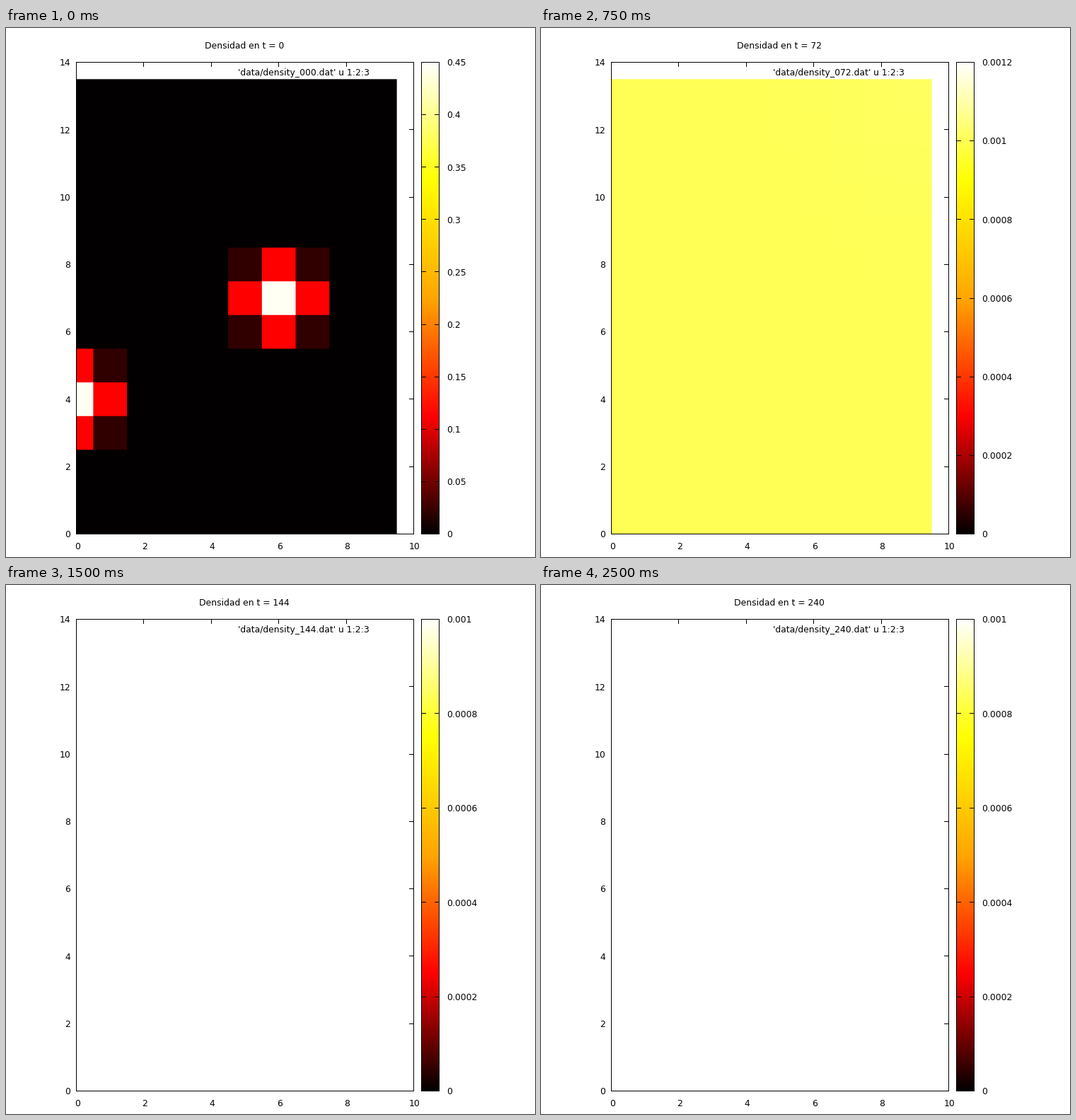
Animation of 748 by 748 pixels, one loop 2750 ms. Source, as a matplotlib script:

```python
import numpy as np
import matplotlib.pyplot as plt
from matplotlib.animation import FuncAnimation

SIZE = 748
DPI = 88
COLS, ROWS = 10, 14
STEPS = 11
LEFT, RIGHT, TOP, BOTTOM = 99, 576, 48, 715
BAR_L, BAR_R = 587, 612
TICK = 6
FLOOR = 0.001
Y, X = np.mgrid[:ROWS, :COLS]

plt.rcParams["font.family"] = "DejaVu Sans"
plt.rcParams["font.size"] = 12.4 * 72 / DPI


def x_px(v):
    return LEFT + 0.5 + (RIGHT - LEFT) * v / COLS


def y_px(v):
    return BOTTOM + 0.5 - (BOTTOM - TOP) * v / ROWS


def palette(v):
    """Black, red, orange, yellow, white in equal steps."""
    stops = np.linspace(0, 1, 5)
    channels = ([0, 255, 255, 255, 255], [0, 0, 165, 255, 255], [0, 0, 0, 0, 255])
    return np.stack([np.interp(v, stops, c) for c in channels], axis=-1)


# Density fields, indexed [row, column]

def two_blobs():
    field = np.full((ROWS, COLS), FLOOR)
    for cx, cy in [(0, 4), (6, 7)]:
        dx, dy = abs(X - cx), abs(Y - cy)
        near = np.maximum(dx, dy) <= 1
        field[near] = np.array([0.445, 0.1125, 0.021])[(dx + dy)[near]]
    return field


def spread_cloud():
    """Bell that bends to the right and widens towards the top."""
    h = Y - 5
    center = 5.8 + 0.12 * h + 0.031 * h ** 2
    width = np.maximum(14, 12 + 1.1 * h)
    bell = np.exp(-(Y - 10.5) ** 2 / 21 - (X - center) ** 2 / width)
    return np.maximum(FLOOR, 0.093 * bell)


def corner_rest(peak):
    """What is left in the top right corner."""
    fall = (COLS - 1 - X) ** 1.8 / 7.3 + (ROWS - 1 - Y) ** 1.8 / 11
    return FLOOR + peak * np.exp(-fall)


# Field, colour bar intervals, interval size; the last one stays to the end
SCENES = [
    (two_blobs(), 9, 0.05),
    (spread_cloud(), 10, 0.01),
    (corner_rest(6.8e-3), 8, 0.001),
    (corner_rest(1.2e-5), 6, 0.0002),
    (corner_rest(0), 6, 0.0002),
    (corner_rest(0), 5, 0.0002),
]


def coverage(lo, hi):
    """Share of every pixel that each span lo..hi covers."""
    px = np.arange(SIZE)
    ends = np.minimum(hi[:, None], px + 1)
    starts = np.maximum(lo[:, None], px)
    return np.clip(ends - starts, 0, 1)


x_edges = np.maximum(x_px(np.arange(COLS + 1) - 0.5), LEFT + 1)
y_edges = np.minimum(y_px(np.arange(ROWS + 1) - 0.5), BOTTOM)
COVER_X = coverage(x_edges[:-1], x_edges[1:])
COVER_Y = coverage(y_edges[1:], y_edges[:-1])


def paint_cells(img, colors):
    """Blend the cells into the white ground."""
    img -= np.einsum("ry,rck,cx->yxk", COVER_Y, 255 - colors, COVER_X, optimize=True)


def box(img, left, right):
    img[TOP:BOTTOM + 1, [left, right]] = 0
    img[[TOP, BOTTOM], left:right + 1] = 0


def bar_y(k, count):
    return BOTTOM + 0.5 - (BOTTOM - TOP) * k / count


def render(field, count, step):
    img = np.full((SIZE, SIZE, 3), 255.0)
    paint_cells(img, palette(field / (count * step)))
    box(img, LEFT, RIGHT)
    for v in range(2, COLS, 2):
        img[TOP:TOP + TICK + 1, int(x_px(v))] = 0
    for v in range(2, ROWS, 2):
        img[int(y_px(v)), RIGHT - TICK:RIGHT + 1] = 0

    ramp = palette(np.linspace(1, 0, BOTTOM - TOP + 1))
    img[TOP:BOTTOM + 1, BAR_L:BAR_R + 1] = ramp[:, None]
    box(img, BAR_L, BAR_R)
    for k in range(1, count):
        y = int(bar_y(k, count))
        img[y, BAR_L:BAR_L + TICK + 1] = 0
        img[y, BAR_R - TICK:BAR_R + 1] = 0
    return np.clip(np.round(img), 0, 255).astype(np.uint8)


fig = plt.figure(figsize=(SIZE / DPI, SIZE / DPI), dpi=DPI, facecolor="white")
ax = fig.add_axes([0, 0, 1, 1])
picture = ax.imshow(render(*SCENES[0]), extent=(0, SIZE, SIZE, 0),
                    interpolation="none", aspect="auto")
ax.axis("off")


def label(x, y, text="", ha="center"):
    return ax.text(x, y, text, ha=ha, va="baseline", color="black")


for v in range(0, COLS + 1, 2):
    label(x_px(v) + 1.2, 737, str(v))
for v in range(0, ROWS + 1, 2):
    label(91.2, y_px(v) + 4.8, str(v), "right")
title = label(337, 29)
key = label(513.8, 67, ha="right")
bar_labels = [label(623.2, 0, ha="left") for _ in range(11)]


def update(i):
    t = 24 * i
    field, count, step = SCENES[min(i, len(SCENES) - 1)]
    picture.set_data(render(field, count, step))
    title.set_text(f"Densidad en t = {t}")
    key.set_text(f"'data/density_{t:03d}.dat' u 1:2:3")
    for k, lab in enumerate(bar_labels):
        lab.set_visible(k <= count)
        lab.set_text(f"{k * step:g}")
        lab.set_y(bar_y(k, count) + 4.8)
    return [picture, title, key, *bar_labels]


anim = FuncAnimation(fig, update, frames=STEPS, interval=250, repeat=True,
                     repeat_delay=0, blit=False)
plt.show()
```
